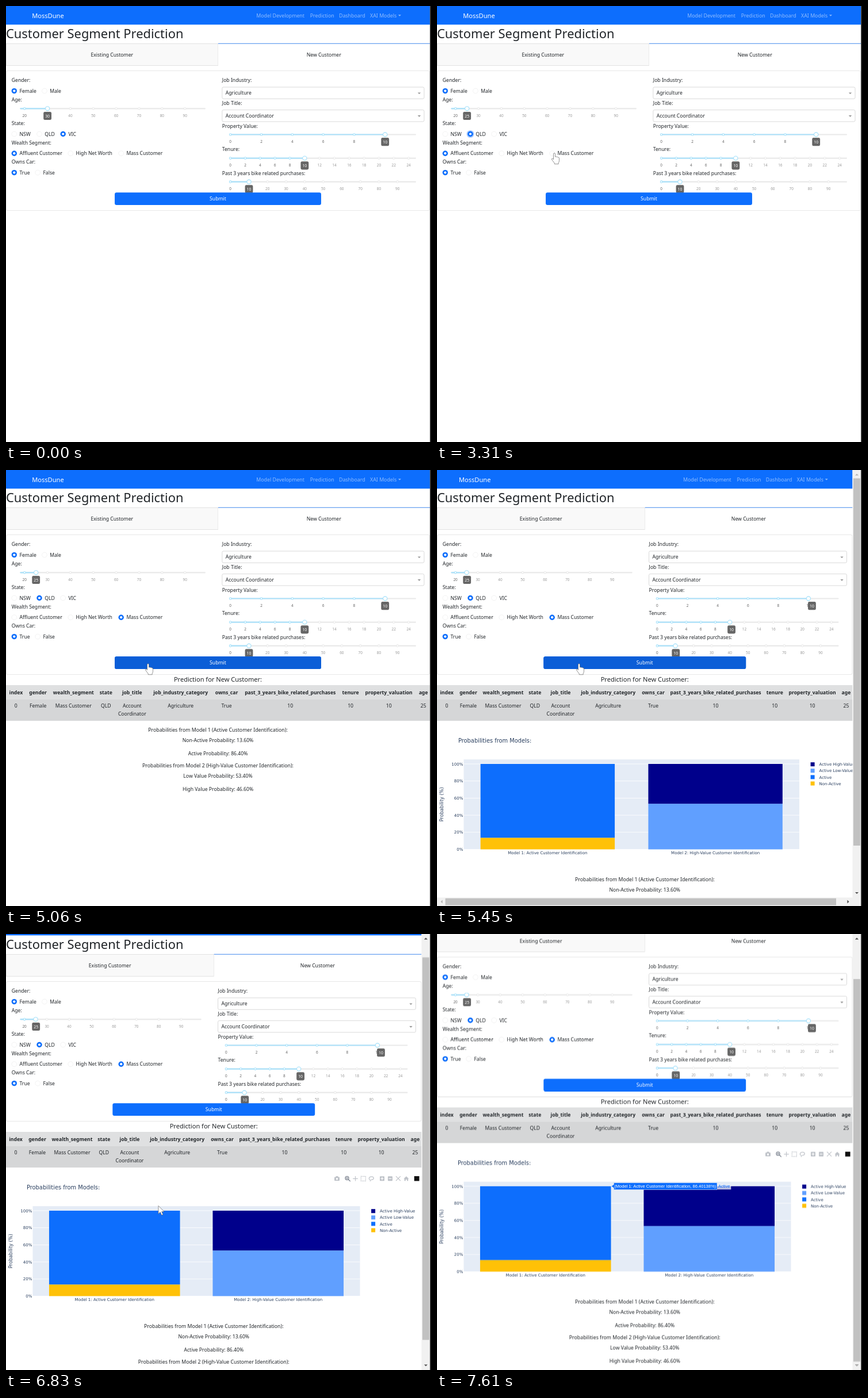
These frames come from a looping animation (739 px wide and 758 px high, 8000 ms). An HTML page:

```html
<!DOCTYPE html>
<html lang="en">
<head>
<meta charset="utf-8">
<title>Customer Segment Prediction</title>
<style>
html, body { margin: 0; width: 100%; height: 100%; overflow: hidden; background: #fff; }
#stage { display: block; width: 739px; height: 758px; }
text { font: 8.65px "Noto Sans", "Open Sans", sans-serif; fill: #212529; white-space: pre; }
.k { animation: 8s step-end infinite; }
.mid { text-anchor: middle; }
.end { text-anchor: end; }
.white { fill: #fff; }
.brand { font-size: 11.1px; fill: #fff; }
.nav { font-size: 8.8px; fill: #fff; fill-opacity: .55; }
.h1 { font-size: 21.9px; font-weight: 500; }
.h5 { font-size: 11.05px; font-weight: 500; }
.h6 { font-size: 8.75px; font-weight: 500; }
.th { font-weight: 700; }
.mark { font-size: 6.4px; fill: #999; }
.mark.on { fill: #666; }
.tip { font-size: 6.8px; fill: #fff; }
.plot { font: 7px "DejaVu Sans", sans-serif; fill: #2a3f5f; }
.title { font-size: 9.85px; }
.axis { font-size: 8.2px; }
.hover { font: 7.5px "Liberation Sans", Arial, sans-serif; }
</style>
</head>
<body>
<svg id="stage" viewBox="0 0 739 758" xmlns="http://www.w3.org/2000/svg"></svg>
<script>
const LOOP = 8000, WIDE = 737, NARROW = 722.5;
const BLUE = '#0d6efd', NAVY = '#00008b', SKY = '#609fff', GOLD = '#ffc107';
const rules = [];

// Hard-stepped keyframes from [ms, value] pairs
function steps(prop, list) {
  const name = 'k' + rules.length;
  const frames = list.map(([t, v]) => `${t / LOOP * 100}%{${prop}:${v}}`).join('');
  rules.push(`@keyframes ${name}{${frames}}`);
  return `class="k" style="animation-name:${name}"`;
}
const during = (from, to, body) =>
  `<g ${steps('opacity', [[0, 0], [from, 1], [to, 0]])}>${body}</g>`;

const text = (x, y, s, cls = '') => `<text x="${x}" y="${y}" class="${cls}">${s}</text>`;
const rect = (x, y, w, h, fill, more = '') =>
  `<rect x="${x}" y="${y}" width="${w}" height="${h}" fill="${fill}" ${more}/>`;
const dot = (x, y, r, fill, more = '') => `<circle cx="${x}" cy="${y}" r="${r}" fill="${fill}" ${more}/>`;
const path = (d, fill, more = '') => `<path d="${d}" fill="${fill}" ${more}/>`;
const range = (a, b, step) => Array.from({ length: Math.floor((b - a) / step) + 1 }, (_, i) => a + i * step);

function slider(x0, x1, y, min, max, marks, value, tipX) {
  const at = v => x0 + (v - min) / (max - min) * (x1 - x0);
  const ring = on => `stroke="${on ? '#a3e0fa' : '#e9e9e9'}" stroke-width="1.1"`;
  return rect(x0, y - 1.1, x1 - x0, 2.2, '#e9e9e9', 'rx="1.1"') +
    rect(x0, y - 1.1, at(value) - x0, 2.2, '#abe2fb', 'rx="1.1"') +
    marks.map(v => dot(at(v), y, 1.8, '#fff', ring(v <= value)) +
      text(at(v), y + 14.2, v, 'mark mid ' + (v <= value ? 'on' : ''))).join('') +
    dot(at(value), y, 3.6, '#fff', ring(true)) +
    rect(tipX - 6.9, y + 5.6, 13.8, 14.2, '#666', 'rx="2.4"') +
    text(tipX, y + 15.2, value, 'tip mid');
}

const picked = (x, y, fill = BLUE) => dot(x, y, 4.7, fill) + dot(x, y, 2.1, '#fff');
const focus = (x, y) => dot(x, y, 6.6, BLUE, 'opacity=".35"');
const radio = (x, y, label) =>
  dot(x, y, 4.4, '#fff', 'stroke="#ececec" stroke-width=".7"') + text(x + 9.2, y + 3.1, label);

function select(x, y, right, label) {
  const ax = right - 8.5;
  return rect(x, y, right - x, 20.3, '#fff', 'rx="2.2" stroke="#d0d0d0" stroke-width=".8"') +
    text(x + 6, y + 13.3, label) + path(`M${ax - 2.7} ${y + 9.4}h5.4l-2.7 2.9z`, '#999');
}

function header(w) {
  const c = w / 2;
  const links = [['Model Development', 66.8], ['Prediction', 160.3], ['Dashboard', 210.5], ['XAI Models', 264.6]];
  return rect(0, 0, w, 32.4, BLUE) + text(c - 323.3, 20.8, 'MossDune', 'brand') +
    links.map(([s, x]) => text(c + x, 19.6, s, 'nav')).join('') +
    path(`M${c + 313.5} 15.2h5l-2.5 2.6z`, '#fff', 'opacity=".55"') +
    text(0, 56, 'Customer Segment Prediction', 'h1') +
    rect(.4, 65.4, c, 38, '#f9f9f9', 'stroke="#dcdcdc" stroke-width=".8"') +
    rect(c + .4, 65, c, 39, '#fff') + rect(c + .4, 64.7, c - .4, 1.3, '#6ea4f0') +
    text(c / 2, 87.6, 'Existing Customer', 'mid') + text(c * 1.5, 87.6, 'New Customer', 'mid') +
    rect(.4, 112.6, w - .8, 243, '#fff', 'rx="2.6" stroke="#dfdfdf" stroke-width=".8"');
}

function leftForm(w) {
  const labels = [['Gender:', 132], ['Age:', 166.2], ['State:', 207], ['Wealth Segment:', 240.8], ['Owns Car:', 274.3]];
  const radios = [
    [14.3, 147.6, 'Female'], [67, 147.6, 'Male'],
    [14.3, 222.5, 'NSW'], [58, 222.5, 'QLD'], [99.2, 222.5, 'VIC'],
    [14.3, 256.2, 'Affluent Customer'], [112.3, 256.2, 'High Net Worth'], [200.2, 256.2, 'Mass Customer'],
    [14.3, 289.6, 'True'], [55.2, 289.6, 'False']];
  const ages = [[30, 0], [29, 950], [28, 1140], [27, 1330], [26, 1540], [25, 1740]];
  const tipX = v => 24.3 + (v - 18) / 81 * (WIDE / 2 - 45.8);
  return labels.map(([s, y]) => text(9.8, y, s)).join('') +
    radios.map(r => radio(...r)).join('') +
    picked(14.3, 147.6) + picked(14.3, 289.6) +
    during(0, 2720, picked(99.2, 222.5)) +
    during(2720, 3700, focus(58, 222.5)) + during(2720, LOOP, picked(58, 222.5)) +
    during(0, 3700, picked(14.3, 256.2)) +
    during(3700, 4860, focus(200.2, 256.2)) + during(3700, LOOP, picked(200.2, 256.2)) +
    during(4270, 4660, picked(58, 222.5, '#5a6268') + picked(14.3, 289.6, '#4c5a70')) +
    ages.map(([v, t], i) => during(t, ages[i + 1]?.[1] ?? LOOP,
      slider(24.3, w / 2 - 21.5, 178.3, 18, 99, range(20, 90, 10), v, tipX(v)))).join('');
}

function rightForm(w) {
  const x = w / 2 + 7.3, x0 = x + 14.4, x1 = w - 24;
  const labels = [['Job Industry:', 132], ['Job Title:', 172], ['Property Value:', 211.5],
    ['Tenure:', 252.2], ['Past 3 years bike related purchases:', 293.6]];
  // Bubbles keep the offset they had on the wide page
  const bar = (y, max, marks) =>
    slider(x0, x1, y, 0, max, marks, 10, x0 + 10 / max * (WIDE / 2 - 45.7));
  return labels.map(([s, y]) => text(x, y, s)).join('') +
    select(x, 141, w - 10, 'Agriculture') + select(x, 180.7, w - 10, 'Account Coordinator') +
    bar(223.5, 12, range(0, 10, 2)) + bar(264.6, 25, range(0, 24, 2)) + bar(305.7, 100, range(0, 90, 10));
}

function submit(w) {
  const button = fill => rect(w * .2565, 324.2, w * .487, 21.8, fill, 'rx="3.2"');
  return button(BLUE) + during(4270, 5840, button('#0b5ed7')) + text(w / 2, 338.3, 'Submit', 'mid white');
}

const form = w => header(w) + leftForm(w) + rightForm(w) + submit(w);

function table(w) {
  const cols = [['index', 17, '0'], ['gender', 54.5, 'Female'], ['wealth_segment', 115, 'Mass Customer'],
    ['state', 170.3, 'QLD'], ['job_title', 215, 'Account'], ['job_industry_category', 297.7, 'Agriculture'],
    ['owns_car', 376, 'True'], ['past_3_years_bike_related_purchases', 484.5, '10'], ['tenure', 587.3, '10'],
    ['property_valuation', 652.6, '10'], ['age', 711.5, '25']];
  const k = w / NARROW;
  return text(w / 2, 367.6, 'Prediction for New Customer:', 'h5 mid') +
    rect(0, 374, w, 25.4, '#dfe0e1') + rect(0, 399, w, 37, '#d5d6d7') +
    cols.map(([head, x, v]) => text(x * k, 389.8, head, 'th mid') + text(x * k, 413.3, v, 'mid')).join('') +
    text(215 * k, 427.2, 'Coordinator', 'mid');
}

const summary = (w, dy) => [
  ['Probabilities from Model 1 (Active Customer Identification):', 715.3, 'h6'],
  ['Non-Active Probability: 13.60%', 732.7],
  ['Active Probability: 86.40%', 755.7],
  ['Probabilities from Model 2 (High-Value Customer Identification):', 777.4, 'h6'],
  ['Low Value Probability: 53.40%', 794.7],
  ['High Value Probability: 46.60%', 817.9]
].map(([s, y, cls = '']) => text(w / 2, y + dy, s, cls + ' mid')).join('');

function chart(right) {
  const left = 46.5, base = 659.5, full = 148.5, slot = (right - left) / 2;
  const y = p => base - full * p / 100;
  const bar = (i, from, to, fill) =>
    rect(left + slot * (i + .1), y(to), slot * .8, y(from) - y(to), fill);
  const legend = [['Active High-Value', NAVY], ['Active Low-Value', SKY], ['Active', BLUE], ['Non-Active', GOLD]];
  return text(right > 620 ? 37 : 36, 474, 'Probabilities from Models:', 'plot title') +
    rect(left, 503.2, right - left, base - 503.2, '#e5ecf6') +
    range(0, 100, 20).map(p => rect(left, y(p) - .4, right - left, .8, '#fff') +
      text(45.3, y(p) + 2.6, p + '%', 'plot end')).join('') +
    bar(0, 0, 13.6, GOLD) + bar(0, 13.6, 100, BLUE) + bar(1, 0, 53.4, SKY) + bar(1, 53.4, 100, NAVY) +
    text(left + slot / 2, 667.5, 'Model 1: Active Customer Identification', 'plot mid') +
    text(left + slot * 1.5, 667.5, 'Model 2: High-Value Customer Identification', 'plot mid') +
    `<g transform="translate(11 581.3) rotate(-90)">${text(0, 0, 'Probability (%)', 'plot axis mid')}</g>` +
    legend.map(([s, fill], i) => rect(right + 19.6, 508.2 + i * 11.1, 7, 7, fill) +
      text(right + 34.6, 514.3 + i * 11.1, s, 'plot')).join('');
}

function modebar() {
  const line = (d, more = '') => path(d, 'none', `stroke="#bfc3c9" stroke-width="1.2" ${more}`);
  const box = x => rect(x - 4, 451.2, 8, 8, '#bfc3c9', 'rx="1"');
  const sign = d => path(d, 'none', 'stroke="#fff" stroke-width="1.2"');
  return rect(571, 452.4, 9, 6.6, '#bfc3c9', 'rx="1"') + rect(573.6, 451, 3.8, 2, '#bfc3c9') + dot(575.5, 455.8, 1.7, '#fff') +
    path('M595.7 457l3 3M590 454.4a3 3 0 1 0 6 0a3 3 0 1 0-6 0M591.6 454.4h2.8M593 453v2.8', 'none', 'stroke="#7f8692" stroke-width="1.3"') +
    line('M603.2 455.3h8.6M607.5 451v8.6') +
    line('M617.3 451.3h8v8h-8z', 'stroke-dasharray="1.6 1"') +
    line('M633 457.3c-3-1-2-5.500 2.500-5.500s5.500 4.800 0 5.500q-3 0-2 2.800') +
    box(654) + sign('M651.500 455.200h5M654 452.700v5') + box(668) + sign('M665.500 455.200h5') +
    line('M678 451.200l8 8M686 451.200l-8 8') +
    path('M691.500 455.500l4.500-4.300 4.500 4.300h-1.200v3.800h-2.200v-2.600h-2.200v2.600h-2.200v-3.800z', '#bfc3c9') +
    rect(709.8, 451, 8.8, 8.4, '#111');
}

// Scroll bars
const tri = (x, y, turn, fill = '#505050') =>
  `<g transform="translate(${x} ${y}) rotate(${turn})">${path('M-3 1.600h6l-3-3.200z', fill)}</g>`;
const DIM = '#b5b5b5';
const scroll = [[0, 0], [6830, 30], [7020, 62.5], [7210, 72.5]];
const slide = (sign, k) => steps('transform', scroll.map(([t, s]) => [t, `translateY(${sign * s * k}px)`]));

function bars() {
  const both = rect(722.5, 0, 14.8, 758, '#f1f1f1') +
    rect(724, 14.5, 12, 638.5, '#c1c1c1') + tri(730, 8, 0, DIM) + tri(730, 735.5, 180) +
    rect(0, 743.3, 737.3, 15, '#f1f1f1') + rect(14.5, 744.6, 679.5, 12, '#c1c1c1') +
    tri(8, 750.6, -90, DIM) + tri(715, 750.6, 90);
  const tall = rect(722.5, 0, 14.8, 758, '#f1f1f1') +
    `<g ${slide(1, .877)}>${rect(724, 14.5, 12, 665, '#c1c1c1')}</g>` +
    tri(730, 8, 0, DIM) + during(6830, LOOP, tri(730, 8, 0)) +
    tri(730, 750, 180) + during(7210, LOOP, tri(730, 750, 180, DIM));
  return during(5450, 5640, both) + during(5640, LOOP, tall);
}

function hoverLabel() {
  return path('M303 438.500l4.500-3v-3h179.500v12h-179.500v-3z', BLUE, 'stroke="#e5ecf6" stroke-width=".6"') +
    rect(487.3, 432.8, 24, 11.4, '#e5ecf6', 'opacity=".8"') +
    text(308.3, 441.2, '(Model 1: Active Customer Identification, 86.40138%)', 'hover white') +
    `<g style="--c:${BLUE}"><text x="489" y="441.2" class="hover" style="fill:var(--c)">Active</text></g>`;
}

function pointer() {
  const shapes = {
    arrow: 'M0 0V14L3.300 11 5.600 16.300 8 15.300 5.700 10.200H10Z',
    hand: 'M-1.500 1.200a1.500 1.500 0 0 1 3 0V6.200q1.500-.9 2.800 .2 1.500-.4 2.400 .7 1.800-.2 1.800 1.600v4q0 2.500-1.300 4v2H.2v-1.600L-4.300 11q-.8-1.600 .6-2 1 0 2.200 1.700Z'
  };
  const moves = [
    [380, 'arrow', 190, 154], [570, 'arrow', 128, 166],
    [760, 'hand', 72, 177], [950, 'hand', 68, 177], [1140, 'hand', 64, 177],
    [1330, 'hand', 60, 177], [1540, 'hand', 56, 177], [1740, 'hand', 52, 177],
    [1930, 'arrow', 57, 205], [2130, 'arrow', 61.5, 226.5],
    [2530, 'hand', 58, 221], [2920, 'arrow', 96, 232], [3120, 'arrow', 158, 246],
    [3310, 'hand', 204, 256], [3510, 'hand', 211, 256],
    [3890, 'arrow', 222, 288], [4080, 'arrow', 236, 306], [4270, 'hand', 247, 337],
    [5840, 'arrow', 250, 372], [6030, 'arrow', 257, 420], [6230, 'arrow', 263, 460], [6430, 'arrow', 265, 472.5]];
  return moves.map(([t, kind, x, y], i) => during(t, moves[i + 1]?.[0] ?? 7610,
    path(shapes[kind], '#fff', `transform="translate(${x} ${y})" stroke="#666" stroke-width=".7" stroke-linejoin="round"`))).join('');
}

const widePage = form(WIDE) + during(5060, 5450, table(WIDE) + summary(WIDE, -260));
const narrowPage = form(NARROW) + table(NARROW) + summary(NARROW, 0) +
  during(5450, 5640, chart(630)) + during(5640, LOOP, chart(615.5)) + during(6230, LOOP, modebar());

document.getElementById('stage').innerHTML =
  rect(0, 0, 739, 758, '#fff') +
  during(0, 5450, widePage) +
  during(5450, LOOP, `<svg width="${NARROW}" height="758" overflow="hidden"><g ${slide(-1, 1)}>${narrowPage}</g></svg>`) +
  bars() + during(7610, LOOP, hoverLabel()) + rect(737.3, 0, 1.7, 758, '#111') + pointer();

const sheet = document.createElement('style');
sheet.textContent = rules.join('\n');
document.head.append(sheet);
</script>
</body>
</html>
```
